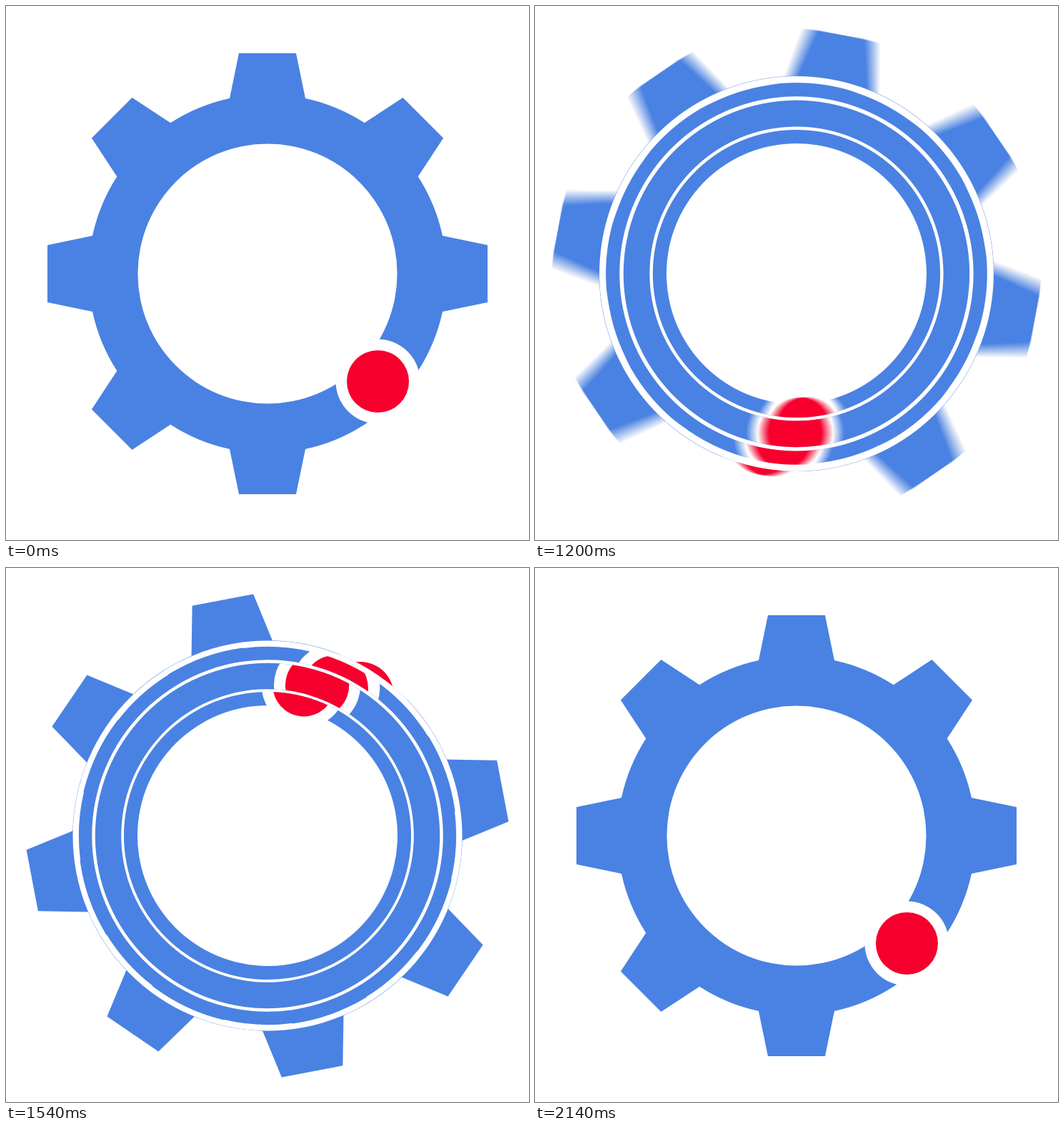
Write an HTML page with a canvas that moves like this. It is 732x746 px and loops after 2500 ms.

```html
<!DOCTYPE html>
<html>
<head>
<meta charset="utf-8">
<style>
  html, body { margin: 0; width: 732px; height: 746px; overflow: hidden; background: #fff; }
  canvas { display: block; }
</style>
</head>
<body>
<canvas id="stage" width="732" height="746"></canvas>
<script>
const W = 732, H = 746, LOOP = 2500, STEP = 20, SAMPLES = 16;
const BLUE = '#4a82e3', RED = '#f7002d';
const view = document.getElementById('stage').getContext('2d');
const buffer = document.createElement('canvas');
buffer.width = W;
buffer.height = H;
const pen = buffer.getContext('2d');

// Smooth curve through [time, value] keys, flat at turning points and ends.
function curve(keys) {
  const slope = i => (keys[i + 1][1] - keys[i][1]) / (keys[i + 1][0] - keys[i][0]);
  const tangents = keys.map((_, i) => {
    if (i === 0 || i === keys.length - 1) return 0;
    const a = slope(i - 1), b = slope(i);
    return a * b > 0 ? 2 * a * b / (a + b) : 0;
  });
  return t => {
    if (t <= keys[0][0]) return keys[0][1];
    const i = keys.findIndex(k => k[0] > t) - 1;
    if (i < 0) return keys[keys.length - 1][1];
    const [t0, v0] = keys[i], [t1, v1] = keys[i + 1];
    const d = t1 - t0, u = (t - t0) / d, w = 1 - u;
    return v0 * w * w * (1 + 2 * u) + v1 * u * u * (3 - 2 * u)
      + d * u * w * (tangents[i] * w - tangents[i + 1] * u);
  };
}

// Angles are in degrees: wind up, one turn with overshoot, settle.
const spin = curve([[800, 0], [1000, -20], [1200, 43], [1540, 239],
  [1800, 373], [1940, 392], [2140, 360]]);

// How far the rings move apart.
function spread(t) {
  const open = t < 1320 ? (t - 1080) / 240 : 1 - ((t - 1320) / 360) ** 1.15;
  return 0.204 * Math.max(0, open);
}

// How far the outermost ring turns ahead of the innermost.
const twist = t => 0.31 * (t - 800) * spread(t);

// Width of the motion blur.
function smear(t) {
  const u = (t - 1120) / 420;
  return u > 0 && u < 1 ? 7.6 * Math.sin(Math.PI * u) : 0;
}

const rings = [
  { inner: 100, outer: 200.5, grow: 0.03 },
  { inner: 199.5, outer: 235, grow: 0.3 },
  { inner: 233.2, outer: 251.2, grow: 0.61 },
  { inner: 250.4, outer: 400, grow: 1 }
];
const whole = [{ inner: 100, outer: 400, grow: 0 }];

const rad = deg => deg * Math.PI / 180;

function annulus(inner, outer) {
  const path = new Path2D();
  path.arc(0, 0, outer, 0, 2 * Math.PI);
  path.closePath();
  path.moveTo(inner, 0);
  path.arc(0, 0, inner, 0, 2 * Math.PI);
  return path;
}

// Eight tooth positions; the one under the dot stays empty.
function makeGear() {
  const path = new Path2D();
  const base = Math.hypot(53, 245), half = Math.atan2(53, 245);
  for (let i = 0; i < 8; i++) {
    const a = rad(45 * i), c = Math.cos(a), s = Math.sin(a);
    path.arc(0, 0, base, a - rad(45) + half, a - half);
    if (i === 1) {
      path.arc(0, 0, base, a - half, a + half);
    } else {
      path.lineTo(308 * c + 40 * s, 308 * s - 40 * c);
      path.lineTo(308 * c - 40 * s, 308 * s + 40 * c);
    }
  }
  path.closePath();
  path.moveTo(181.5, 0);
  path.arc(0, 0, 181.5, 0, 2 * Math.PI);
  return path;
}
const gear = makeGear();

function disc(r, color) {
  pen.fillStyle = color;
  pen.beginPath();
  pen.arc(154.5, 150.5, r, 0, 2 * Math.PI);
  pen.fill();
}

function drawPart(part, angle, scale) {
  pen.save();
  pen.translate(366, 374);
  pen.rotate(rad(angle));
  pen.scale(scale, scale);
  pen.clip(annulus(part.inner, part.outer), 'evenodd');
  pen.fillStyle = BLUE;
  pen.fill(gear, 'evenodd');
  disc(59, '#fff');
  disc(43.5, RED);
  pen.restore();
}

function drawPose(t, offset) {
  const e = spread(t);
  pen.fillStyle = '#fff';
  pen.fillRect(0, 0, W, H);
  for (const part of e > 0 ? rings : whole) {
    const lead = part.grow ** 1.15;
    drawPart(part, spin(t) + twist(t) * lead + offset, 1 + e * part.grow);
  }
}

// Motion blur is the running average of poses spread over the blur angle.
function render(t) {
  const blur = smear(t), count = blur > 0 ? SAMPLES : 1;
  for (let i = 0; i < count; i++) {
    drawPose(t, blur * ((i + 0.5) / count - 0.5));
    view.globalAlpha = 1 / (i + 1);
    view.drawImage(buffer, 0, 0);
  }
}

const start = performance.now();
let shown = -1;
function tick() {
  const t = Math.floor((performance.now() - start) % LOOP / STEP) * STEP;
  if (t !== shown) render(shown = t);
  requestAnimationFrame(tick);
}
tick();
</script>
</body>
</html>
```
